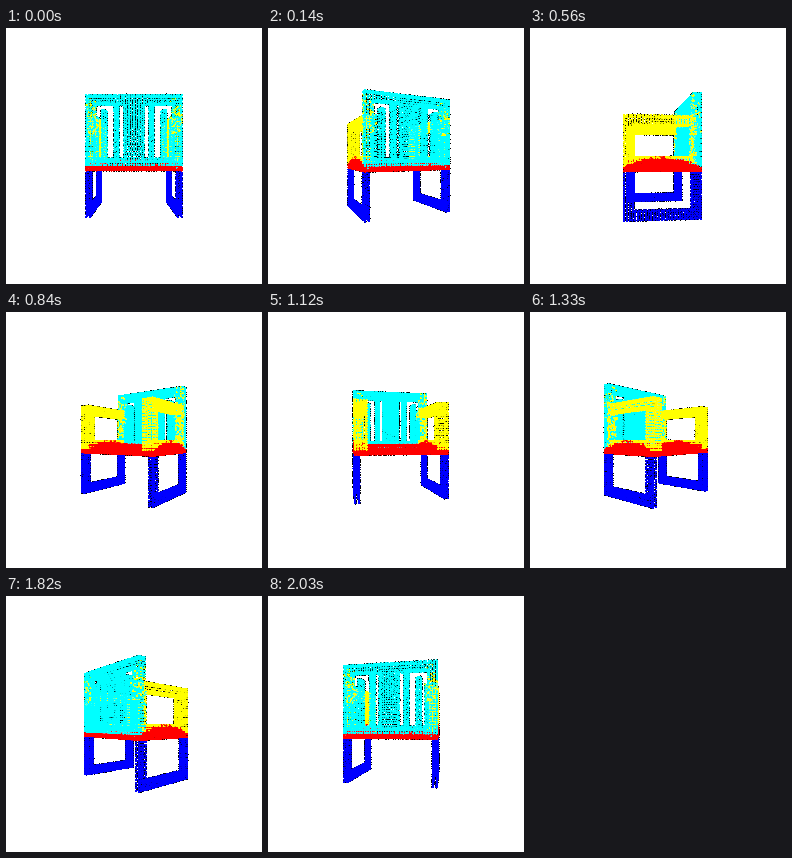
A matplotlib script that plays this animation: 256x256 px, repeating every 2100 ms.

```python
import numpy as np
import matplotlib.pyplot as plt
from matplotlib.animation import FuncAnimation

SIZE, FRAMES, LOOP = 256, 30, 2100
FOCAL = SIZE / 2 / np.tan(np.radians(30))
DIST = 3.0
RADIUS = 1.28          # point radius in pixels
STEP = 0.029           # spacing of the surface samples
LAYERS = 8

# chair dimensions: x width, y height, z depth
X, Z = 0.553, 0.427
TOP, ARM, BOTTOM = 0.708, 0.447, -0.704
RAIL, SEAT_TOP, SEAT_LOW = -0.015, -0.07, -0.165
POST, LEG_W, ARM_W, BACK = 0.1, 0.043, 0.125, 0.345

CYAN, YELLOW, BLUE, RED = (0, 1, 1), (1, 1, 0), (0, 0, 1), (1, 0, 0)

rng = np.random.default_rng(4)


def grid(a0, a1, b0, b1):
    """Regular samples of a rectangle, borders included."""
    na = max(2, round((a1 - a0) / STEP) + 1)
    nb = max(2, round((b1 - b0) / STEP) + 1)
    a, b = np.meshgrid(np.linspace(a0, a1, na), np.linspace(b0, b1, nb))
    return a.ravel(), b.ravel()


def slab(rect, depth, holes=()):
    """Surface of a plate with rectangular holes, as (u, v, w) points."""
    u0, u1, v0, v1 = rect
    w0, w1 = depth
    parts = []
    for w in depth:
        u, v = grid(*rect)
        parts.append(np.c_[u, v, np.full_like(u, w)])
    for a0, a1, b0, b1 in (rect, *holes):
        for a in (a0, a1):
            v, w = grid(b0, b1, w0, w1)
            parts.append(np.c_[np.full_like(v, a), v, w])
        for b in (b0, b1):
            u, w = grid(a0, a1, w0, w1)
            parts.append(np.c_[u, np.full_like(u, b), w])
    pts = np.concatenate(parts)
    u, v = pts[:, 0], pts[:, 1]
    keep = np.ones(len(pts), bool)
    eps = 1e-6
    for a0, a1, b0, b1 in holes:
        keep &= ~((u > a0 + eps) & (u < a1 - eps) & (v > b0 + eps) & (v < b1 - eps))
    return pts[keep]


def build_back():
    low = -0.03
    right = [(0.375, 0.46, low, 0.61), (0.227, 0.46, 0.535, 0.61),
             (0.227, 0.325, low, 0.61), (0.112, 0.184, low, 0.605)]
    left = [(-a1, -a0, b0, b1) for a0, a1, b0, b1 in right]
    return slab((-X, X, SEAT_LOW, TOP), (BACK, Z), right + left)


def build_side(sign):
    inner = Z - POST
    arm = slab((-Z, Z, SEAT_LOW, ARM), (X - ARM_W, X),
               [(-inner, inner, RAIL, ARM - POST)])
    leg = slab((-Z, Z, BOTTOM, SEAT_LOW), (X - LEG_W, X),
               [(-inner, inner, BOTTOM + POST, SEAT_LOW)])
    z, y, w = np.concatenate([arm, leg]).T
    return np.c_[sign * w, y, z]


def build_seat():
    x, z, y = slab((-X, X, -Z, Z), (SEAT_LOW, SEAT_TOP)).T
    return np.c_[x, y, z]


def paint(pts):
    """Colour every point by the chair part it belongs to."""
    x, y, z = pts.T
    ax = np.abs(x)
    chance = rng.random(len(pts))
    color = np.empty((len(pts), 3))
    color[:] = RED
    above = y > RAIL - 0.105 * (z / Z) ** 2 + rng.normal(0, 0.006, len(pts))
    color[above & (ax > X - ARM_W - 0.01)] = YELLOW
    back = above & (z > BACK - 0.03)
    color[back] = CYAN
    inner = back & (ax > X - ARM_W) & (z < BACK + 0.025)
    color[inner & (chance < np.where(y < ARM + 0.03, 0.65, 0.25))] = YELLOW
    joint = back & (ax > 0.42) & (y > 0.25) & (y < 0.6)
    color[joint & (chance < 0.2)] = YELLOW
    color[y < SEAT_LOW - 1e-6] = BLUE
    return color


points = np.concatenate([build_back(), build_side(1), build_side(-1), build_seat()])
colors = paint(points)
points = points + rng.normal(0, 0.0015, points.shape)


def render(i):
    t = 2 * np.pi * i / FRAMES
    x, y, z = points.T
    depth = DIST + x * np.sin(t) - z * np.cos(t)
    px = SIZE / 2 + FOCAL * (x * np.cos(t) + z * np.sin(t)) / depth
    py = SIZE / 2 - FOCAL * y / depth

    # every pixel touched by a point, with a soft falloff
    off = np.arange(-2, 3)
    dx, dy = (d.ravel() for d in np.meshgrid(off, off))
    col = np.floor(px).astype(int)[:, None] + dx
    row = np.floor(py).astype(int)[:, None] + dy
    dist2 = (col + 0.5 - px[:, None]) ** 2 + (row + 0.5 - py[:, None]) ** 2
    alpha = 1 - dist2 / RADIUS ** 2
    src, k = np.nonzero(alpha > 0)
    pix = row[src, k] * SIZE + col[src, k]
    alpha = alpha[src, k]

    order = np.lexsort((depth[src], pix))
    src, pix, alpha = src[order], pix[order], alpha[order]
    _, start, count = np.unique(pix, return_index=True, return_counts=True)
    rank = np.arange(len(pix)) - np.repeat(start, count)

    # composite front to back over black
    img = np.zeros((SIZE * SIZE, 3))
    clear = np.ones(SIZE * SIZE)
    for layer in range(LAYERS):
        m = rank == layer
        p = pix[m]
        img[p] += (clear[p] * alpha[m])[:, None] * colors[src[m]]
        clear[p] *= 1 - alpha[m]
    img = np.clip((img - 0.25) * 2.5, 0, 1)
    img[clear == 1] = 1
    return img.reshape(SIZE, SIZE, 3)


fig = plt.figure(figsize=(SIZE / 100, SIZE / 100), dpi=100, facecolor="white")
ax = fig.add_axes([0, 0, 1, 1])
ax.axis("off")
view = ax.imshow(render(0), interpolation="nearest", aspect="auto")


def update(i):
    view.set_data(render(i))
    return [view]


anim = FuncAnimation(fig, update, frames=FRAMES, interval=LOOP / FRAMES,
                     repeat=True, repeat_delay=0, blit=False)
plt.show()
```
